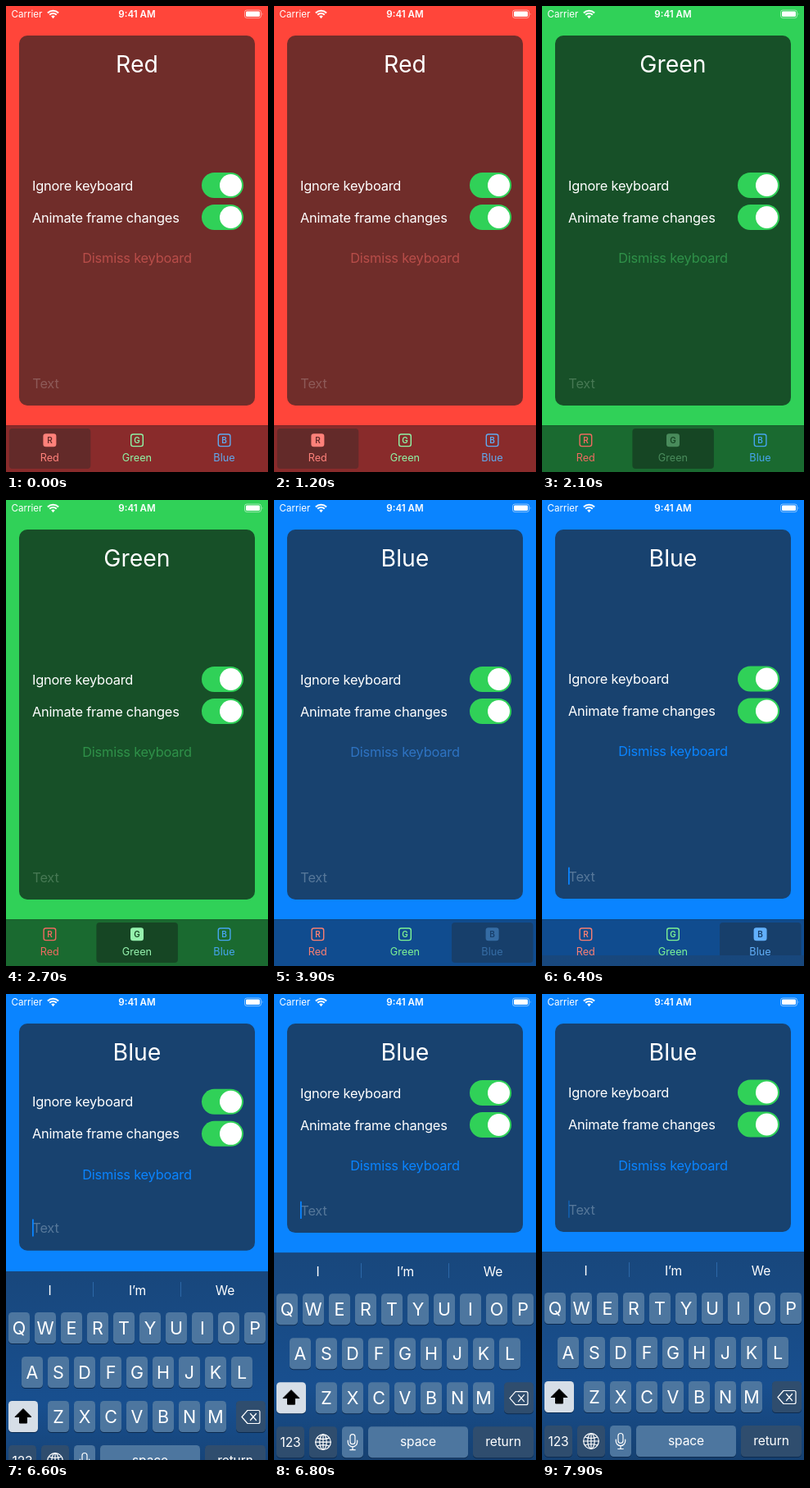
Write an HTML page that moves like this. It is 320 by 568 pixels and loops after 8000 ms.

```html
<!DOCTYPE html>
<html lang="en">
<head>
<meta charset="utf-8">
<title>Keyboard and tabs</title>
<style>
  html, body { margin: 0; width: 100%; height: 100%; overflow: hidden; background: #000; }
  svg { display: block; width: 320px; height: 568px; }
  text { font-family: Inter, Roboto, sans-serif; fill: #fff; }
  .mid { text-anchor: middle; }
  .body { font-size: 16.4px; letter-spacing: -.013em; }
  .status { font-size: 11.6px; }
  .title { font-size: 28.4px; }
  .label { font-size: 12.7px; }
  .letter { font-size: 21.5px; }
  .small { font-size: 15.6px; letter-spacing: -.01em; }
  .tab .ink { fill: var(--ink); }
  .tab .line { fill: none; stroke: var(--ink); stroke-width: 1.4; }
  .tab .glyph { font-size: 10px; font-weight: 600; fill: var(--ink); }
  .tab .pick { fill: none; }
  .tab.on .pick { fill: var(--pick); }
  .tab.on .line { fill: var(--ink); }
  .tab.on .glyph { fill: var(--pick); }
  .stroke { fill: none; stroke: #fff; stroke-width: 1.2; stroke-linecap: round; stroke-linejoin: round; }
</style>
</head>
<body>
<svg id="stage" viewBox="0 0 320 568"></svg>
<script>
const LOOP = 8000, STEP = 100;
const KEYBOARD_START = 6380, CARD_START = 6394;
const scenes = [
  { at: 0, name: 'Red', bg: '#ff453a', card: '#702d2a', bar: '#892b2b', pick: '#632a29',
    off: '#b84d49', hint: '#8d5a58', inks: ['#ff817a', '#8ff5a6', '#61a9ee'] },
  { at: 2000, name: 'Green', bg: '#30d158', card: '#175028', bar: '#1a6a30', pick: '#164624',
    off: '#2f9149', hint: '#467853', inks: ['#ee6a60', '#96f2ae', '#46a5ee'] },
  { at: 3800, name: 'Blue', bg: '#0a84ff', card: '#18426f', bar: '#104c8f', pick: '#173f6b',
    off: '#2e73c2', hint: '#567799', inks: ['#f87f72', '#7ef394', '#62b0fb'] }
];

const text = (x, y, s, cls, extra = '') => `<text x="${x}" y="${y}" class="${cls}" ${extra}>${s}</text>`;
const rect = (x, y, w, h, r, extra = '') =>
  `<rect x="${x}" y="${y}" width="${w}" height="${h}" rx="${r}" ${extra}/>`;
const path = (d, extra = 'class="stroke"') => `<path d="${d}" ${extra}/>`;
const fill = name => `style="fill:var(--${name})"`;

function statusBar() {
  const arc = (r, w) => path(
    `M${57.5 - r * .7} ${15 - r * .7}A${r} ${r} 0 0 1 ${57.5 + r * .7} ${15 - r * .7}`,
    `fill="none" stroke="#fff" stroke-width="${w}"`);
  return text(6.5, 14.3, 'Carrier', 'status') +
    arc(9.4, 2.1) + arc(6.1, 2.1) +
    path('M57.5 15.2L55.2 12.5Q57.5 10.7 59.8 12.5Z', 'fill="#fff"') +
    text(160, 14.3, '9:41 AM', 'status mid', 'font-weight="600"') +
    rect(291.5, 5, 20, 9.6, 2.6, 'fill="none" stroke="#fff" stroke-opacity=".5"') +
    rect(293, 6.5, 17, 6.6, 1.4, 'fill="#fff"') +
    path('M312.8 8.2Q314.4 9.8 312.8 11.4Z', 'fill="#fff" fill-opacity=".6"');
}

function toggleRow(y, label) {
  return text(32, y + 6, label, 'body') +
    rect(239, y - 15.5, 51, 31, 15.5, 'fill="#30d158"') +
    `<circle cx="274.5" cy="${y}" r="13.5" fill="#fff"/>`;
}

function tab({ name }, i) {
  const x = 53.3 + i * 106.6;
  return `<g class="tab">` +
    rect(x - 49.5, 515, 99.5, 49, 4, 'class="pick"') +
    `<g class="item">` + rect(x - 7.2, 522, 14.6, 14.6, 2.6, 'class="line"') +
    text(x + .1, 532.9, name[0], 'glyph mid') +
    text(x, 554.6, name, 'label mid ink') + '</g></g>';
}

function key(x, y, w, color, content = '') {
  return rect(x, y + 1, w, 38, 4.5, 'fill="#0c2b50"') +
    rect(x, y, w, 38, 4.5, `fill="${color}"`) + content;
}

function keyboard() {
  const light = '#4d769f', dark = '#2f4d6e';
  const row = (letters, x0, y) => [...letters].map((c, i) => {
    const x = x0 + i * 32;
    return key(x, y, 26, light, text(x + 13, y + 27, c, 'letter mid'));
  }).join('');
  const word = (x, s) => text(x, 342.5, s, 'small mid');
  const divider = x => rect(x, 327, 1, 18, 0, 'fill="#2c68a8"');
  const globe = '<g class="stroke" stroke-width="1"><circle cx="60" cy="545" r="9.3"/>' +
    '<ellipse cx="60" cy="545" rx="4.2" ry="9.3"/>' +
    path('M50.7 545H69.3M60 535.7V554.3M52.5 540Q60 543 67.5 540M52.5 550Q60 547 67.5 550') + '</g>';
  const mic = rect(93, 535.5, 6, 12, 3, 'class="stroke"') +
    path('M90.3 543V545A5.7 5.7 0 0 0 101.7 545V543M96 551V554.5M92.8 554.5H99.2');
  return rect(0, 314, 320, 270, 0, 'fill="url(#board)"') +
    word(53.5, 'I') + word(160.5, 'I’m') + word(267.5, 'We') + divider(106) + divider(213) +
    row('QWERTYUIOP', 3, 364) + row('ASDFGHJKL', 19, 418) + row('ZXCVBNM', 51, 472) +
    key(3, 472, 36, '#d6dee7',
      path('M21 481.5L31 491.5H25.5V499H16.5V491.5H11Z', 'fill="#000" stroke="#000" stroke-linejoin="round"')) +
    key(281, 472, 36, dark,
      path('M295 483.5H308Q310 483.5 310 485.5V497.5Q310 499.5 308 499.5H295L288 491.5ZM298.5 487.5L305.5 495.5M305.5 487.5L298.5 495.5')) +
    key(3, 526, 34, dark, text(20, 551, '123', 'small mid')) +
    key(43, 526, 34, dark, globe) +
    key(83, 526, 26, light, mic) +
    key(115, 526, 122, light, text(176, 550.3, 'space', 'small mid')) +
    key(243, 526, 74, dark, text(280, 550.3, 'return', 'small mid'));
}

const stage = document.getElementById('stage');
stage.innerHTML =
  '<defs><linearGradient id="board" x2="0" y2="1"><stop stop-color="#18477c"/>' +
  '<stop offset=".6" stop-color="#184f8f"/><stop offset="1" stop-color="#153e6c"/></linearGradient></defs>' +
  rect(0, 0, 320, 568, 0, fill('bg')) + statusBar() +
  rect(16, 36, 288, 451, 10, 'id="card" ' + fill('card')) +
  text(160, 80.5, '', 'title mid', 'id="title"') +
  '<g id="controls">' + toggleRow(218.5, 'Ignore keyboard') + toggleRow(257.5, 'Animate frame changes') +
  text(160, 313, 'Dismiss keyboard', 'body mid', 'id="dismiss"') + '</g>' +
  '<g id="field">' + text(32.3, 465.7, 'Text', 'body', fill('hint')) +
  rect(32, 448.5, 1.8, 21.5, .9, 'id="caret" ' + fill('bg')) + '</g>' +
  '<g id="bar">' + rect(0, 511, 320, 57, 0, fill('bar')) +
  rect(0, 511, 320, .5, 0, 'fill="#000" fill-opacity=".25"') + scenes.map(tab).join('') + '</g>' +
  `<g id="keys">${keyboard()}</g>`;

const part = id => document.getElementById(id);
const [card, title, controls, dismiss, field, caret, keys] =
  ['card', 'title', 'controls', 'dismiss', 'field', 'caret', 'keys'].map(part);
const tabs = [...stage.querySelectorAll('.tab')];

const shift = (el, y) => el.setAttribute('transform', `translate(0 ${y.toFixed(2)})`);
const ramp = (t, a, b) => Math.min(1, Math.max(0, (t - a) / (b - a)));

// Critically damped spring, 0 to 1
function spring(ms) {
  const x = Math.max(0, ms) * .018;
  return 1 - (1 + x) * Math.exp(-x);
}

function caretAlpha(t) {
  if (t < KEYBOARD_START) return 0;
  return 1 - ramp(t, 6830, 7030) + ramp(t, 7250, 7450) - .9 * ramp(t, 7780, 7960);
}

function draw(t) {
  const current = scenes.filter(s => s.at <= t).length - 1;
  const scene = scenes[current];
  const editing = t >= KEYBOARD_START;
  for (const name of ['bg', 'card', 'bar', 'pick', 'hint']) stage.style.setProperty('--' + name, scene[name]);
  title.textContent = scene.name;
  dismiss.style.fill = editing ? scene.bg : scene.off;

  // A freshly tapped tab stays dim for a moment
  const pressed = current ? .4 + .6 * ramp(t, scene.at + 100, scene.at + 300) : 1;
  tabs.forEach((el, i) => {
    el.classList.toggle('on', i === current);
    el.style.setProperty('--ink', scene.inks[i]);
    el.querySelector('.item').style.opacity = i === current ? pressed : 1;
  });

  const lift = 197 * spring(t - CARD_START);
  card.setAttribute('height', 451 - lift);
  shift(controls, -lift / 2);
  shift(field, -lift);
  caret.style.opacity = caretAlpha(t);
  keys.style.display = editing ? '' : 'none';
  shift(keys, 254 * (1 - spring(t - KEYBOARD_START)));
}

const start = performance.now();
function tick() {
  const t = (performance.now() - start) % LOOP;
  draw(Math.floor(t / STEP) * STEP);
  requestAnimationFrame(tick);
}
tick();
</script>
</body>
</html>
```
